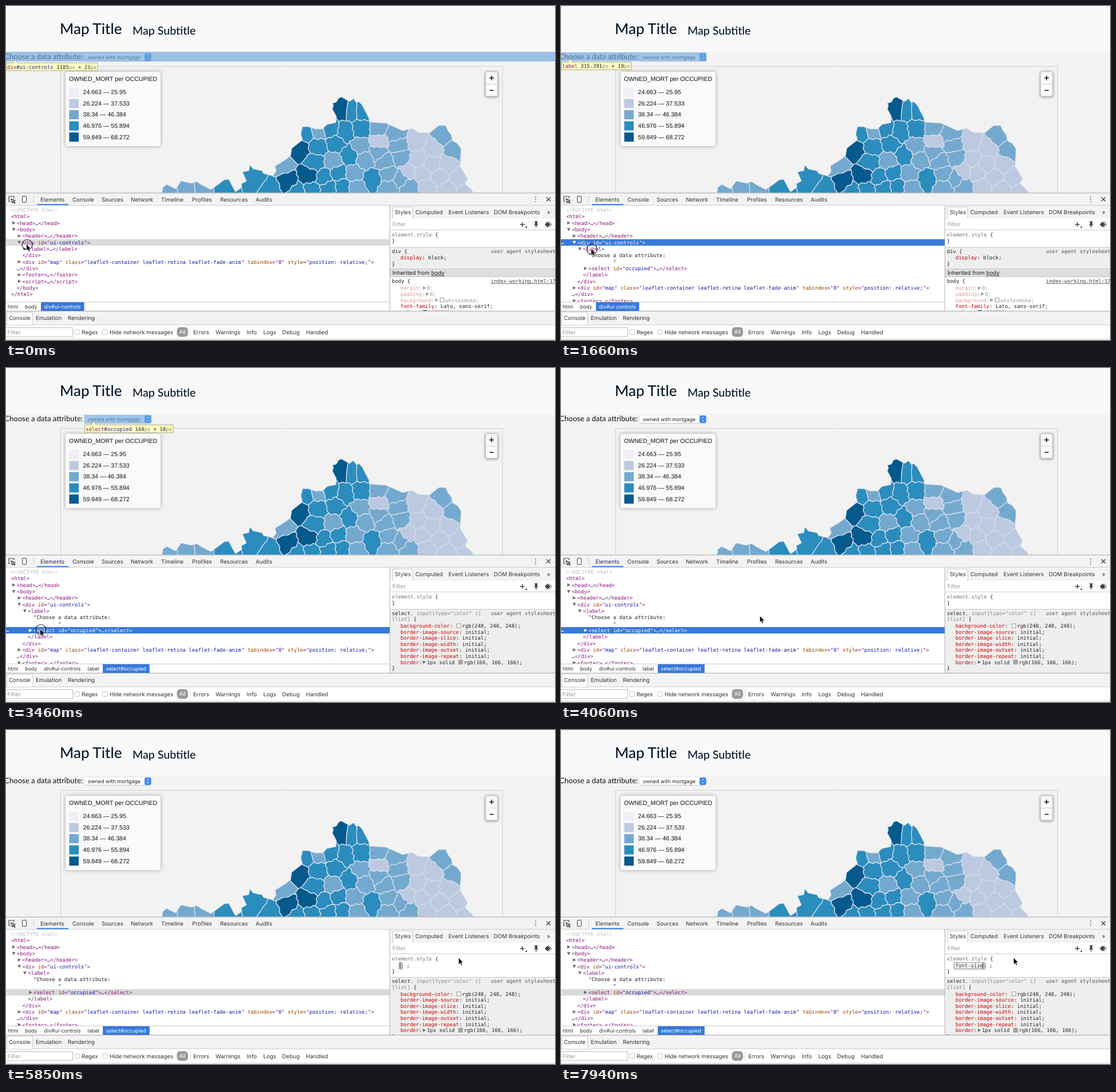
Write an HTML page with a canvas that moves like this. It is 959 px wide and 584 px high and loops after 8 s.

```html
<!DOCTYPE html>
<html lang="en">
<head>
<meta charset="utf-8">
<title>Inspecting a map page</title>
<style>
  html, body { margin: 0; width: 100%; height: 100%; overflow: hidden; }
  canvas { display: block; }
</style>
</head>
<body>
<canvas width="959" height="584"></canvas>
<script>
const ctx = document.querySelector('canvas').getContext('2d');
const LOOP = 8000, STEP = 150, ADVANCE = 5.39;
const UI = '9.76px Inter, sans-serif', SMALL = '8.95px Inter, sans-serif';
const MONO = '8.95px "DejaVu Sans Mono", monospace', LEGEND = '10.58px "Liberation Sans", sans-serif';
const BLUE = '#3879d9', TAG = '#881280', ATTR = '#994500', VALUE = '#1a1aa6', PROP = '#c80000';
const RAMP = ['#f1eef6', '#bdc9e1', '#74a9cf', '#2b8cbe', '#045a8d'];

// ---- drawing helpers ----
function text(s, x, y, color = '#333', font = UI, align = 'left') {
  ctx.font = font;
  ctx.fillStyle = color;
  ctx.textAlign = align;
  ctx.fillText(s, x, y + 3.3);
}
function rect(x, y, w, h, fill, border, radius = 0) {
  ctx.beginPath();
  ctx.roundRect(x, y, w, h, radius);
  if (fill) { ctx.fillStyle = fill; ctx.fill(); }
  if (border) { ctx.strokeStyle = border; ctx.lineWidth = 1; ctx.stroke(); }
}
function shadowed(blur, offset, draw) {
  ctx.save();
  ctx.shadowColor = 'rgba(0,0,0,.35)';
  ctx.shadowBlur = blur;
  ctx.shadowOffsetY = offset;
  draw();
  ctx.restore();
}
function shape(d, x, y, fill, stroke, width = 1) {
  ctx.save();
  ctx.translate(x, y);
  const path = new Path2D(d);
  if (fill) { ctx.fillStyle = fill; ctx.fill(path); }
  if (stroke) { ctx.strokeStyle = stroke; ctx.lineWidth = width; ctx.stroke(path); }
  ctx.restore();
}
function clipped(x, y, w, h, draw) {
  ctx.save();
  ctx.beginPath();
  ctx.rect(x, y, w, h);
  ctx.clip();
  draw();
  ctx.restore();
}
function arrow(x, y, open, color = '#6e6e6e') {
  shape(open ? 'M-3 -2.5H3L0 3Z' : 'M-2.5 -3V3L3 0Z', x, y, color);
}
// Monospace run of [text, colour] pairs; ▸ and ■ are drawn as a triangle and a swatch.
function mono(x, y, ...runs) {
  for (const [s, color = '#222'] of runs) {
    if (s === '▸') {
      arrow(x + 4, y, false, color);
      x += 8.5;
    } else if (s === '■') {
      rect(x + 1.5, y - 3.5, 7, 7, color, '#999');
      x += 10.8;
    } else {
      text(s, x, y, color, MONO);
      x += s.length * ADVANCE;
    }
  }
}

// ---- county map: Voronoi cells clipped to the state outline ----
const outline = new Path2D(`M272 330L274 317 281 312 296 320 306 306 324 310 333 307 342 313
  358 321 372 311 381 304 389 303 397 318 401 325 412 317 411 311 420 306 413 290 424 288 426 278
  432 285 447 288 450 293 466 297 472 289 470 280 488 269 497 262 499 249 518 234 515 224 518 211
  528 211 540 215 553 215 561 207 576 204 577 193 570 180 572 174 570 170 577 168 581 161 586 159
  600 167 607 162 612 169 616 167 622 173 634 196 635 203 664 205 693 218 709 214 720 221 740 222
  756 209 768 209 772 218 778 226 780 236 788 240 795 250 793 280 806 302 802 311 814 322 818 330Z`);
const sites = [];
function plant(level, coords) {
  for (let i = 0; i < coords.length; i += 2) sites.push({ x: coords[i], y: coords[i + 1], level });
}
plant(4, [588, 181, 513, 251, 491, 306, 529, 297]);
plant(3, [605, 183, 622, 184, 524, 222, 567, 216, 592, 220, 621, 215, 575, 240, 545, 246, 600, 262, 540, 273,
  556, 300, 580, 292, 564, 318, 533, 321, 510, 326, 640, 303, 436, 302, 462, 318, 380, 316, 587, 316]);
plant(2, [545, 219, 620, 245, 572, 272, 482, 280, 627, 268, 608, 293, 650, 215, 680, 224, 650, 256, 686, 244, 690, 264,
  662, 272, 764, 228, 784, 252, 668, 294, 690, 302, 668, 318, 705, 316, 345, 316, 312, 318, 284, 320, 612, 318]);
plant(1, [651, 237, 717, 238, 745, 248, 720, 268, 742, 277, 703, 290, 726, 292, 773, 278, 758, 300, 790, 300,
  735, 316, 770, 320, 803, 322]);

function cellPath(site) {
  let poly = [[260, 150], [830, 150], [830, 335], [260, 335]];
  for (const other of sites) {
    if (other === site) continue;
    const dx = other.x - site.x, dy = other.y - site.y;
    const side = ([x, y]) => (x - site.x - dx / 2) * dx + (y - site.y - dy / 2) * dy;
    poly = poly.flatMap((p, i) => {
      const q = poly[(i + 1) % poly.length], a = side(p), b = side(q), k = a / (a - b);
      const kept = a <= 0 ? [p] : [];
      if (a * b < 0) kept.push([p[0] + (q[0] - p[0]) * k, p[1] + (q[1] - p[1]) * k]);
      return kept;
    });
  }
  const path = new Path2D();
  poly.forEach((p, i) => {
    const q = poly[(i + 1) % poly.length];
    for (let k = 0; k < 1; k += .2) {
      const x = p[0] + (q[0] - p[0]) * k, y = p[1] + (q[1] - p[1]) * k;
      path.lineTo(x + 1.4 * Math.sin(y * .55), y + 1.4 * Math.sin(x * .5));
    }
  });
  path.closePath();
  return path;
}
const cells = sites.map(site => ({ path: cellPath(site), fill: RAMP[site.level] }));

function drawMap() {
  rect(95.5, 105.5, 772, 300, '#f2f2f2', '#cfcfcf');
  ctx.save();
  ctx.clip(outline);
  ctx.strokeStyle = '#d3dce6';
  ctx.lineWidth = 1.2;
  for (const { path, fill } of cells) {
    ctx.fillStyle = fill;
    ctx.fill(path);
  }
  for (const { path } of cells) ctx.stroke(path);
  ctx.restore();
  ctx.lineWidth = 1;
  ctx.strokeStyle = '#d3dce6';
  ctx.stroke(outline);

  shadowed(6, 0, () => rect(104, 115, 166, 130, '#fafafa', null, 4));
  text('OWNED_MORT per OCCUPIED', 110, 127.3, '#111', LEGEND);
  ['24.663 — 25.95', '26.224 — 37.533', '38.34 — 46.384', '46.976 — 55.894', '59.849 — 68.272'].forEach((s, i) => {
    const y = 151 + i * 19.55;
    rect(110.5, y - 8, 16.5, 16, RAMP[i]);
    text(s, 134.5, y, '#111', LEGEND);
  });

  shadowed(4, 1, () => rect(837.5, 114.5, 21.5, 43.5, '#fff', '#bbb', 3));
  shape('M-10.5 0H10.5', 848.3, 136.5, null, '#ccc');
  shape('M-4 0H4M0 -4V4', 848.3, 125.7, null, '#111', 1.6);
  shape('M-3.5 0H3.5', 848.3, 147.5, null, '#111', 1.6);
}

// ---- page ----
const overlays = {
  div: { box: [0, 80, 959, 17], tip: [0, 99], id: '#ui-controls', w: '1185', h: '21' },
  label: { box: [0, 81, 254, 15.5], tip: [0, 97.5], id: '', w: '315.391', h: '19' },
  select: { box: [137, 82, 117, 15], tip: [137, 99], id: '#occupied', w: '144', h: '18' }
};
function drawPage(hover) {
  rect(0, 0, 959, 330, '#f3f3f3');
  rect(0, 0, 959, 80, '#f9f9f9');
  text('Map Title', 94, 45.7, '#07172b', '500 26.04px Lato, sans-serif');
  text('Map Subtitle', 221, 46.2, '#07172b', '500 19.6px Lato, sans-serif');
  text('Choose a data attribute:', 134.3, 89.5, '#111', '13.02px Lato, sans-serif', 'right');
  shadowed(1.5, .5, () => rect(137.5, 83, 116, 13, '#fff', null, 3));
  rect(242, 83, 11.5, 13, '#3b86f5', null, 3);
  shape('M-2 -1.5L0 -3.7L2 -1.5M-2 1.5L0 3.7L2 1.5', 247.7, 89.5, null, '#fff');
  text('owned with mortgage', 143, 89.7, '#222', SMALL);
  drawMap();
  if (!overlays[hover]) return;

  const { box, tip: [x, y], id, w, h } = overlays[hover];
  rect(...box, 'rgba(111,168,220,.66)');
  const length = (hover + id + w + h).length + 8;
  rect(x + .5, y + .5, length * ADVANCE + 3.5, 13.5, '#ffffc2', '#a9a98a');
  shape('M-5 .8L0 -5L5 .8', x + 16, y, '#ffffc2', '#a9a98a');
  mono(x + 2, y + 7.5, [hover, TAG], [id + ' ', VALUE], [w], ['px', '#888'], [' × '], [h], ['px', '#888']);
}

// ---- elements tree ----
const head = [
  [0, '', '<!DOCTYPE html>'], [0, '', '<html>'], [1, '▸', '<head>…</head>'], [1, '▾', '<body>'],
  [2, '▸', '<header>…</header>'], [2, '▾', '<div id="ui-controls">', 'div']
];
const labelClosed = [[3, '▸', '<label>…</label>', 'label']];
const labelOpen = [
  [3, '▾', '<label>', 'label'], [4, '', '"Choose a data attribute:', 'note'], [4, '', '        "', 'note'],
  [4, '▸', '<select id="occupied">…</select>', 'select'], [3, '', '</label>']
];
const tail = [
  [2, '', '</div>'],
  [2, '▸', '<div id="map" class="leaflet-container leaflet-retina leaflet-fade-anim" tabindex="0" style="position: relative;">'],
  [1, '', '…</div>'], [2, '▸', '<footer>…</footer>'], [2, '▸', '<script>…</' + 'script>'],
  [1, '', '</body>'], [0, '', '</html>']
];
function markup(s, x, y, color) {
  const runs = s.split(/(\s[\w-]+(?==")|(?<==")[^"]*(?=")|…)/).map(part => {
    const index = s.indexOf(part);
    const own = s.startsWith('<!') ? '#c0c0c0' : !s.includes('<') || part === '…' ? '#222'
      : /^\s/.test(part) ? ATTR : s.slice(index - 2, index) === '="' ? VALUE : TAG;
    return [part, color || own];
  });
  mono(x, y, ...runs);
}
function drawTree({ open, selected, focused, tint }) {
  rect(0, 349, 670, 168, '#fff');
  [...head, ...(open ? labelOpen : labelClosed), ...tail].forEach(([depth, mark, s, id], i) => {
    const y = 356.7 + i * 11.33, x = 9 + depth * 9.76;
    const active = id && id === selected, white = active && focused ? '#fff' : undefined;
    if (active) {
      rect(0, y - 5.6, 670, 11.3, focused ? BLUE : '#dadada');
      text('…', 0, y - .5, '#fff', MONO);
      mono(0, y - 1, ['…', '#fff']);
    } else if (id && id === tint) rect(0, y - 5.6, 670, 11.4, '#e8eff9');
    if (mark) arrow(x - 5.3, y, mark === '▾', white);
    markup(s, x, y, white);
  });
}
function drawCrumbs(selected) {
  rect(0, 517, 670, 16, '#fff');
  rect(0, 517, 670, 1, '#ccc');
  const names = ['html', 'body', 'div#ui-controls', 'label', 'select#occupied'];
  const last = { div: 2, label: 3, select: 4 }[selected];
  let x = 3;
  names.slice(0, last + 1).forEach((name, i) => {
    ctx.font = SMALL;
    const width = ctx.measureText(name).width;
    if (i === last) rect(x - 5.5, 518, width + 11.5, 15, BLUE);
    text(name, x, 525.5, i === last ? '#fff' : '#333', SMALL);
    x += width + 12;
  });
}

// ---- styles pane ----
const GREY = '#888', FADED = '#e29a9a', PALE = '#999';
function drawStyles(selected, typed) {
  const shift = typed === null ? 0 : 10.6;
  rect(671, 392, 288, 141, '#fff');
  mono(674, 399.7, ['element.style', '#777'], [' {']);
  mono(674, 411 + shift, ['}']);
  const top = 421.5 + shift;
  rect(671, top, 288, selected === 'select' ? 112 : 37, '#eee');
  rect(671, top, 288, 1, '#ccc');
  const row = i => 450.8 + shift + i * 10.58;
  const declare = (y, name, ...runs) => mono(689, y, [name, PROP], [':'], ...runs);

  mono(847, 428.3 + shift, ['user agent stylesheet', '#555']);
  if (selected === 'select') {
    mono(674, 428.3 + shift, ['select'], [', input[type="color" i]', GREY]);
    mono(674, 438.7 + shift, ['[list]', GREY], [' {']);
    declare(row(0), 'background-color', [' '], ['■', '#f8f8f8'], ['rgb(248, 248, 248);']);
    ['source', 'slice', 'width', 'outset', 'repeat'].forEach((s, i) =>
      declare(row(i + 1), 'border-image-' + s, [' initial;']));
    declare(row(6), 'border', ['▸', '#6e6e6e'], ['1px solid '], ['■', '#a6a6a6'], ['rgb(166, 166, 166);']);
    mono(674, row(7), ['}']);
    return;
  }
  mono(674, 428.3, [selected], [' {']);
  if (selected === 'div') declare(440, 'display', [' block;']);
  else declare(440, 'cursor', [' default;']);
  mono(674, 450.7, ['}']);
  rect(671, 459.5, 288, 14, '#dedede', '#c4c4c4');
  text('Inherited from body', 675, 466.7, '#222');
  ctx.font = UI;
  const from = ctx.measureText('Inherited from ').width, body = ctx.measureText('body').width;
  rect(675 + from, 471.3, body, .8, '#222');
  mono(674, 480.7, ['body {']);
  mono(847, 480.7, ['index-working.html:17', '#444']);
  rect(847, 485, 112, .8, '#444');
  for (const [i, name] of ['margin', 'padding'].entries())
    mono(689, 493 + i * 10.58, [name, FADED], [':', PALE], ['▸', PALE], ['0;', PALE]);
  mono(689, 514.2, ['background', FADED], [':', PALE], ['▸', PALE], ['■', '#f5f5f5'], ['whitesmoke;', PALE]);
  declare(524.7, 'font-family', [' Lato, sans-serif;']);
  declare(535.5, 'color', [' '], ['■', '#080808'], ['#080808;']);
}

// ---- property editor ----
const fillNames = ['fill', 'fill-opacity', 'fill-rule', 'filter', 'flex', 'flex-basis', 'flex-direction',
  'flex-flow', 'flex-grow', 'flex-shrink'];
const fontNames = ['font', 'font-family', 'font-feature-settings', 'font-kerning', 'font-size', 'font-stretch',
  'font-style', 'font-variant', 'font-variant-ligatures', 'font-weight'];
const typing = [[4960, ''], [6300, 'f'], [6450, 'fo'], [7200, 'font-'], [7350, 'font-s'], [7640, 'font-si'],
  [7790, 'font-siz'], [7940, 'font-size']];

function drawEditor(typed, caret) {
  const names = typed === 'f' ? fillNames : fontNames.filter(name => name.startsWith(typed));
  const suggesting = typed && typed !== 'font-size';
  const shown = suggesting ? names[0].length > typed.length ? names[0] : typed : typed;
  const width = shown.length * ADVANCE;
  shadowed(3, 1, () => rect(687, 406.5, width + 5, 10.5, '#fff', '#aaa'));
  mono(689, 411.7, [typed], [shown.slice(typed.length), GREY], [': ;']);
  if (caret) rect(688.2 + typed.length * ADVANCE, 407, 1, 10, '#111');
  if (!suggesting) return;
  const wide = names.length > 3, pitch = wide ? 12.1 : 13;
  shadowed(3, 1, () => rect(687, 418, wide ? 138 : 84, names.length * pitch + 2, '#fff', '#bbb'));
  names.forEach((name, i) => {
    if (i === 0) rect(687.5, 418.5, wide ? 137 : 83, pitch, BLUE);
    mono(689, 424.7 + i * pitch, [name, i ? '#222' : '#fff']);
  });
}

// ---- fixed tool chrome ----
function drawChrome() {
  rect(0, 326.5, 959, 22, '#f3f3f3');
  rect(0, 326.5, 959, 1, '#a8a8a8');
  rect(0, 348, 959, 1, '#ccc');
  shape('M9 3V0H0V9H3M4 4L11 7L8 8L11 11L10 12L7 9L6 11Z', 5, 333, null, '#444', 1.2);
  rect(28.5, 332.5, 7, 11, null, '#444', 1.5);
  rect(30, 334.5, 4, 6, '#fff');
  rect(48, 331, 1, 14, '#ccc');
  const labels = { Elements: 60, Console: 116, Sources: 167, Network: 218, Timeline: 271, Profiles: 325,
    Resources: 374, Audits: 436 };
  for (const name in labels) text(name, labels[name], 338.3);
  rect(54, 346.3, 55, 2, '#3b83e8');
  [-4, 0, 4].forEach(dy => rect(924.3, 337.3 + dy, 1.8, 1.8, '#555', null, 1));
  shape('M-3.5 -3.5L3.5 3.5M3.5 -3.5L-3.5 3.5', 947.5, 338, null, '#444', 1.4);

  rect(671, 349, 288, 43, '#f3f3f3');
  rect(675.5, 351.5, 35, 21, '#fff', '#ccc');
  rect(671, 372, 288, 19, '#fff');
  rect(671, 391, 288, 1, '#ccc');
  const panes = { Styles: 679, Computed: 715, 'Event Listeners': 773, 'DOM Breakpoints': 852, '»': 945 };
  for (const name in panes) text(name, panes[name], 361);
  text('Filter', 675, 382, '#999');
  shape('M-4 0H4M0 -4V4', 902, 382, null, '#444', 1.5);
  shape('M0 0H-3.5L0 -3.5Z', 910, 388, '#444');
  shape('M-3 -5H3V-4H2V0L4 2H.7V6H-.7V2H-4L-2 0V-4H-3Z', 926, 381.5, '#444');
  shape('M0 -5L5 0L0 5L-5 0Z', 946, 382, '#444');
  shape('M2 -5L7 0L2 5', 946, 382, null, '#444');
  rect(670, 349, 1, 184, '#b5b5b5');

  rect(0, 533, 959, 25, '#f3f3f3');
  rect(0, 533, 959, 1, '#aaa');
  rect(0, 557, 959, 27, '#fff');
  rect(0, 557, 959, 1, '#ccc');
  rect(1.5, 535.5, 45, 22.5, '#fff', '#ccc');
  const drawer = { Console: 5, Emulation: 52, Rendering: 108 };
  for (const name in drawer) text(name, drawer[name], 545.7);
  rect(-.5, 562.5, 117, 15.5, '#fff', '#bbb');
  text('Filter', 2.5, 570.5, '#999');
  for (const x of [120, 168.5]) rect(x, 566, 8.5, 8.5, '#fff', '#c4c4c4', 2);
  rect(298.5, 561.5, 19.5, 17, '#999', null, 6);
  text('All', 308.2, 570, '#fff', UI, 'center');
  rect(321, 562, 1, 16, '#ddd');
  const filters = { Regex: 132, 'Hide network messages': 181, Errors: 327, Warnings: 366, Info: 420.5,
    Logs: 449.5, Debug: 482.5, Handled: 524 };
  for (const name in filters) text(name, filters[name], 570.3);
  rect(0, 582, 959, 1, '#ccc');
}

// ---- timeline ----
const latest = (steps, t) => steps.filter(([start]) => t >= start).pop()?.[1];
const hoverSteps = [[0, 'div'], [150, 'label'], [2710, ''], [3010, 'select'], [3910, '']];
const tintSteps = [[0, ''], [150, 'label'], [480, ''], [2710, 'note'], [3010, 'select'], [3460, '']];
const selectSteps = [[0, 'div'], [1680, 'label'], [3460, 'select']];
const pointerSteps = [[0, [35, 416]], [150, [31, 424]], [1230, [38, 425]], [1380, [46, 425]], [1530, [52, 424]],
  [2710, [48, 441]], [2860, [46, 457]], [3010, [54, 457]], [3160, [59, 456]]];
const clicks = [[0, 150], [480, 630], [1530, 1810], [3310, 3610], [4810, 4960]];

function drawPointer(t) {
  let [x, y] = latest(pointerSteps, t);
  const k = Math.min(7, Math.max(0, Math.floor((t - 3760) / STEP) + 1)) / 7;
  const eased = k * k * (3 - 2 * k);
  x += (790 - x) * eased;
  y += (398 - y) * eased;
  if (clicks.some(([start, end]) => t >= start && t < end)) {
    ctx.beginPath();
    ctx.arc(x + 2, y + 1.5, 9, 0, 2 * Math.PI);
    ctx.strokeStyle = '#222';
    ctx.lineWidth = 1.2;
    ctx.stroke();
  }
  shape('M0 0V12L2.7 9.5L4.5 13.5L6.6 12.6L4.9 8.7H8.4Z', x + .5, y, '#000', '#fff', .8);
}

function render(t) {
  const selected = latest(selectSteps, t), typed = latest(typing, t) ?? null;
  ctx.textRendering = 'geometricPrecision';
  drawPage(latest(hoverSteps, t));
  drawChrome();
  clipped(0, 349, 670, 168, () => drawTree({
    open: t >= 630, selected, focused: t >= 480 && t < 4960, tint: latest(tintSteps, t)
  }));
  drawCrumbs(selected);
  clipped(671, 392, 288, 141, () => drawStyles(selected, typed));
  if (typed !== null) drawEditor(typed, t < 5400 || t >= 5850);
  drawPointer(t);
}

const begin = performance.now();
function tick() {
  render((performance.now() - begin) % LOOP);
  requestAnimationFrame(tick);
}
tick();
</script>
</body>
</html>
```
